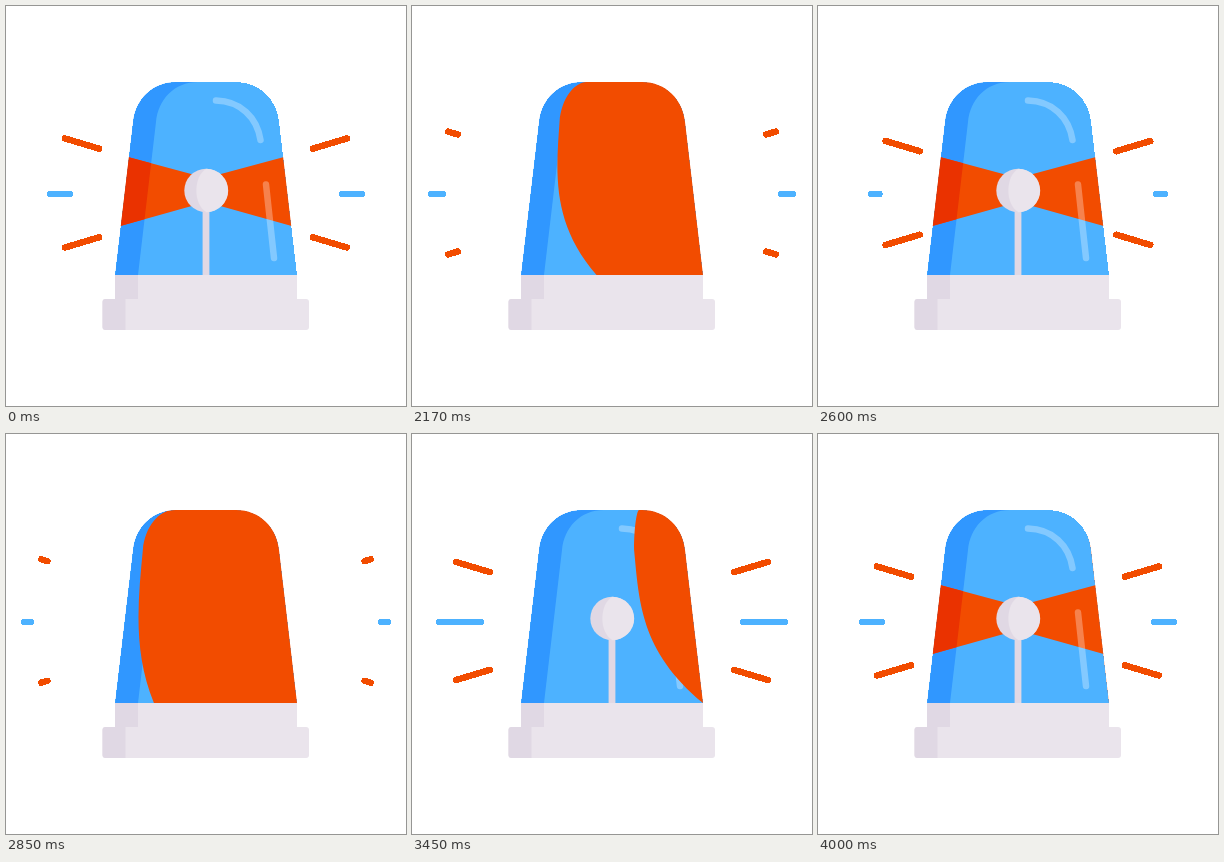
Animation of 400 by 400 pixels, one loop 4020 ms. Source, as an HTML page:

```html
<!DOCTYPE html>
<html lang="en">
<head>
<meta charset="utf-8">
<title>Siren</title>
<style>
  html, body { margin: 0; width: 100%; height: 100%; overflow: hidden; background: #fff; }
  svg { display: block; width: 100vw; height: 100vh; }
  .crisp { shape-rendering: crispEdges; }
</style>
</head>
<body>
<svg viewBox="0 0 400 400">
  <defs>
    <path id="domeShape" d="M109 269L127 116C129 94 146 76 170 76H230C254 76 271 94 273 116L291 269Z"/>
    <path id="sideShape" d="M109 269L127 116C129 94 146 76 170 76H192C168 76 152 94 150 116L132 269Z"/>
    <clipPath id="dome"><use href="#domeShape"/></clipPath>
    <clipPath id="side"><use href="#sideShape"/></clipPath>
    <path id="beam"/>
    <g id="rays" class="crisp" fill="none" stroke-linecap="round">
      <path id="redRays" stroke="#f24c00" stroke-width="6.5"/>
      <path id="blueRay" stroke="#4db2ff" stroke-width="6"/>
    </g>
  </defs>

  <use href="#rays"/>
  <use href="#rays" transform="matrix(-1 0 0 1 400 0)"/>

  <use href="#domeShape" class="crisp" fill="#4db2ff"/>
  <g clip-path="url(#dome)">
    <use href="#sideShape" fill="#3097ff"/>
    <g fill="#f24c00">
      <use href="#beam"/>
      <use href="#beam" transform="matrix(-1 0 0 1 400 0)"/>
    </g>
    <g clip-path="url(#side)" fill="#ea3200">
      <use href="#beam" transform="matrix(-1 0 0 1 400 0)"/>
    </g>
    <path d="M200 200V269" stroke="#e0d8e4" stroke-width="6.8"/>
    <circle cx="200" cy="184.5" r="21.7" fill="#e0d8e4"/>
    <path d="M200.5 162.8A21.7 21.7 0 0 1 200.5 206.2C187 199 187 170 200.5 162.8Z" fill="#eae4ec"/>
    <path d="M210 94.5C234 95 251 111 254.5 134M260 178.5L268 252" fill="none"
      stroke="#fff" stroke-opacity=".3" stroke-width="6.5" stroke-linecap="round"/>
    <path id="sweep" fill="#f24c00"/>
  </g>

  <g fill="#eae4ec">
    <path d="M109 269H291V294H109Z"/>
    <rect x="96.5" y="293" width="206.5" height="31" rx="3"/>
  </g>
  <g fill="#e0d8e4">
    <path d="M109 269H132V293H109Z"/>
    <path d="M119.5 293H99.5A3 3 0 0 0 96.5 296V321A3 3 0 0 0 99.5 324H119.5Z"/>
  </g>
</svg>
<script>
const LOOP = 4020, START = 2000, STEP = 25, TURN = 2000 / 3;
// Within a turn: the sweep curls, then covers the dome, and uncovers it in reverse.
const CURLED = 117, COVERED = 191, SWEPT = 508;

// Edge shapes: x of seven Bezier points at the heights ys.
const ys = [76, 76, 92, 116, 167, 217, 269];
const left = [160, 146, 129, 127, 121, 115, 109];
const curl = [227, 225, 222, 222, 227, 228, 291];
const right = mirror(left);

function mirror(xs) { return xs.map(x => 400 - x); }
const clamp = k => Math.min(1, Math.max(0, k));
const setPath = (id, d) => document.getElementById(id).setAttribute('d', d);

function edge(t) {
  const opening = t < CURLED;
  const k = opening ? (t / CURLED) ** .6 : clamp((t - CURLED) / (COVERED - CURLED));
  const [from, to] = opening ? [right, curl] : [curl, left];
  // The bottom end lags behind the rest of the edge.
  return from.map((x, i) => x + (to[i] - x) * (i === 6 ? k ** 2.2 : k));
}

function sweepPath(p) {
  if (p <= 0 || p >= SWEPT) return '';
  const entering = p < SWEPT / 2;
  const xs = entering ? edge(p) : mirror(edge(SWEPT - p));
  const pts = xs.map((x, i) => x + ' ' + ys[i]);
  return `M${pts[0]}C${pts.slice(1)}H${entering ? 300 : 100}V76Z`;
}

// The beam grows out of the lamp, then empties from its inner end.
function beamPath(p) {
  const leaving = p < 200;
  const from = leaving ? p * .8 : 0;
  const to = leaving ? 100 : Math.min(100, (p - 352) * .9);
  if (to <= from) return '';
  const top = d => `${200 + d} ${172 - .27 * d}`;
  const low = d => `${200 + d} ${196 + .28 * d}`;
  return `M${top(from)}L${top(to)} ${low(to * 1.03)} ${low(from)}Z`;
}

// A ray drifts outwards while it grows, then shrinks into its outer end.
function ray(q, end, speed, length, born, growth, yAt) {
  const b = end + speed * (q - TURN);
  const size = length * clamp((q - born) / growth) * (1 - clamp((q - TURN - CURLED) / 81));
  const a = b - size;
  return size > .1 ? `M${a} ${yAt(a)}L${b} ${yAt(b)}` : '';
}

function draw(now) {
  const t = now % LOOP - START;
  const p = Math.max(0, Math.floor((t + 5) / STEP) * STEP) % TURN;
  const q = p < 200 ? p + TURN : p;
  const spread = x => 44.5 + .3 * (x - 307.5);
  const redRay = yAt => ray(q, 341, .13, 34, 467, 83, yAt);
  setPath('redRays', redRay(x => 187 - spread(x)) + redRay(x => 187 + spread(x)));
  setPath('blueRay', ray(q, 356.5, .14, 42, 550, 234, () => 188));
  setPath('beam', beamPath(p));
  setPath('sweep', sweepPath(p));
}

const origin = performance.now();
function frame() {
  draw(performance.now() - origin);
  requestAnimationFrame(frame);
}
frame();
</script>
</body>
</html>
```
